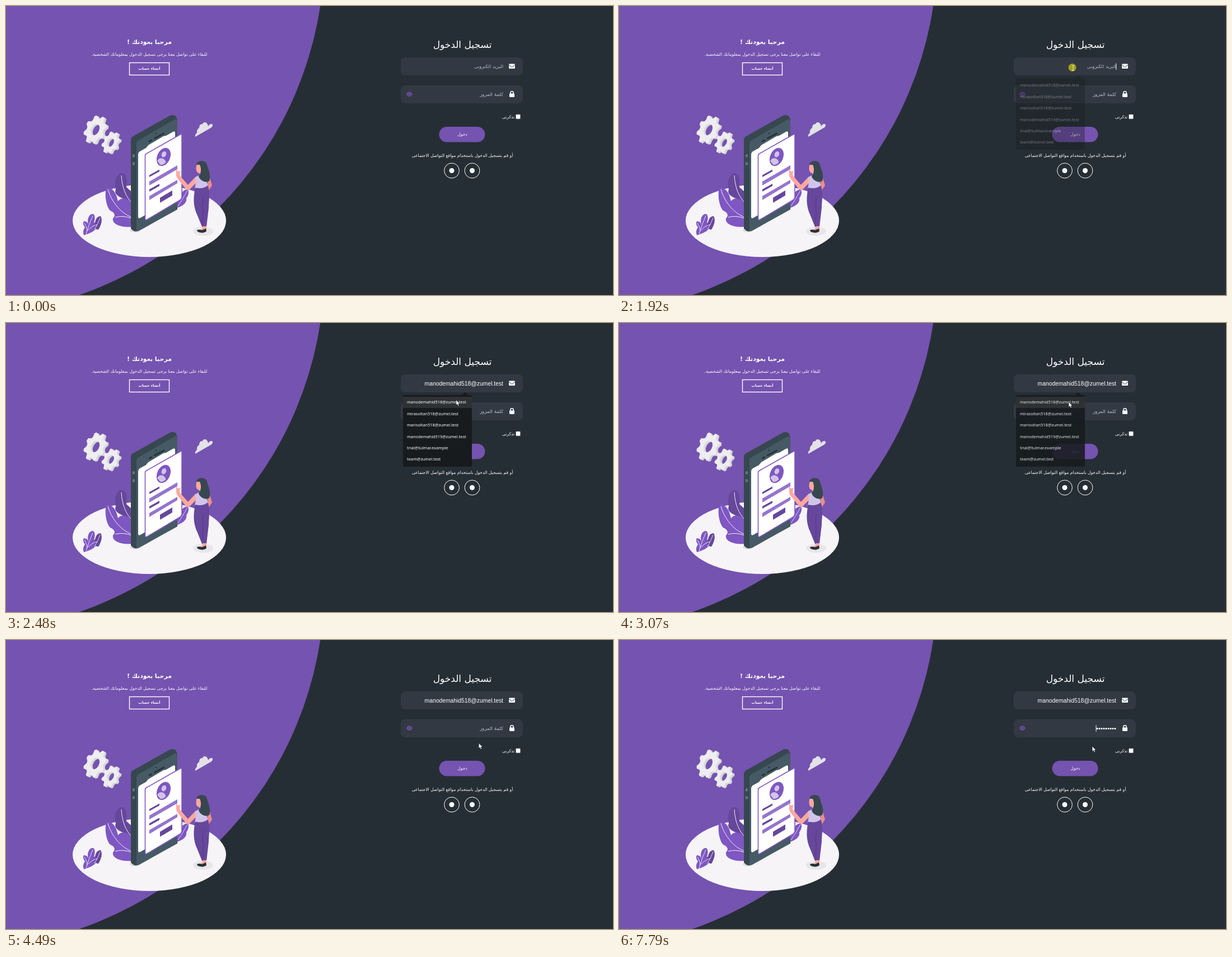
These frames come from a looping animation (1084 px wide and 517 px high, 8000 ms). An HTML page:

```html
<!DOCTYPE html>
<html lang="ar">
<head>
<meta charset="utf-8">
<title>Login</title>
<style>
  html, body { margin: 0; width: 100%; height: 100%; overflow: hidden; background: #262e35; }
  svg { display: block; width: 100%; height: 100%; }
  text { fill: #fff; font-family: "DejaVu Sans", sans-serif; }
  .ar { direction: rtl; }
  .mid { text-anchor: middle; }
  .hint { fill: #b9bcc1; }
  #mail { font: 10.35px "Liberation Sans", Arial, sans-serif; text-anchor: end; }
  #popup text { font: 7.35px "Noto Sans", sans-serif; }
  .line { fill: none; stroke: #fff; }
</style>
</head>
<body>
<svg viewBox="0 0 1084 517">
  <circle cx="-81" cy="-97" r="649.5" fill="#7553b0"/>

  <g id="art">
    <ellipse cx="256" cy="384" rx="137" ry="65" fill="#f6f4f7"/>
    <g id="gears"></g>
    <path d="M338 234Q337 230 341 227Q340 221 345 218Q345 211 351 211Q353 206 358 209Q361 212 361 215Q365 209 369 212Q370 216 364 219Z" fill="#e3e2e6"/>

    <path d="M226 358C212 354 207 351 210 345C198 340 193 335 196 328C193 315 196 300 207 299C217 301 216 315 215 324L226 334Z" fill="#66479b"/>
    <path d="M226 395C205 397 189 390 191 380C197 374 193 369 186 366C176 355 176 325 181 325C195 326 198 341 200 349C206 342 216 342 226 354Z" fill="#7e57c2"/>
    <path class="line" d="M182 328C187 346 202 370 225 378M206 303C207 324 214 342 225 352M195 378Q208 374 225 380" stroke-width=".9"/>

    <ellipse cx="230" cy="401" rx="9" ry="4" fill="#dedce0"/>
    <path d="M223 240Q223 235 227 233L291 197Q298 193 303 197L306 203V364L236 402Q231 405 226 401L223 398Z" fill="#37474f"/>
    <path d="M233 247Q233 242 237 240L301 203Q306 201 306 207V358Q306 363 302 366L238 402Q233 404 233 400Z" fill="#455a64"/>
    <path d="M236 266Q236 262 239 260L250 254L254 249L281 233L286 232L298 225Q302 223 302 227V343L240 379Q236 381 236 377Z" fill="#fff"/>
    <path d="M256 242L260 240M265 237L282 228" stroke="#263238" stroke-width="2.6" stroke-linecap="round"/>
    <circle cx="268" cy="228" r="1.2" fill="#263238"/>
    <g fill="#5f7580"><ellipse cx="228" cy="268" rx="2.2" ry="3"/><ellipse cx="228" cy="282" rx="2.2" ry="3"/></g>

    <path d="M306 356C304 345 308 342 312 340C312 332 320 328 325 328C328 335 324 341 322 344C324 352 315 358 306 361Z" fill="#7e57c2"/>
    <path class="line" d="M324 330Q316 345 307 358" stroke-width=".7"/>
    <path d="M248.5 268Q248.5 265 251 264L311 230Q314 228 314 231V342Q314 345 311 347L252 382Q248.5 384 248.5 380Z" fill="#fff" stroke="#7e57c2" stroke-width="1.6"/>
    <g transform="rotate(24 281.5 270)">
      <ellipse cx="281.5" cy="270" rx="11.5" ry="17" fill="#7e57c2"/>
      <ellipse cx="280" cy="265.500" rx="4" ry="5.500" fill="#d1c4e9"/>
      <path d="M274 281C274 271 287 271 289 278Q285 286 281 285Z" fill="#d1c4e9"/>
    </g>
    <path d="M256 302.500L274 292.500V296L256 306ZM256 328L274 318V322L256 332ZM275 343L297 330V339L275 352Z" fill="#66479b"/>
    <path d="M256 314L306 285V292L256 321ZM256 340L306 311V317L256 347Z" fill="#9575cd"/>

    <path d="M139 410C136 402 140 398 141 396C137 391 137 385 140 385C145 386 146 388 147 391C144 380 149 372 155 372C160 373 159 382 157 388C160 386 165 388 165 391C162 402 150 407 139 410Z" fill="#7e57c2"/>
    <path d="M158 395C159 382 162 376 169 376C173 382 170 392 165 400C162 400 160 399 158 395Z" fill="#66479b"/>
    <path class="line" d="M155 375Q148 391 143 408M163 391Q152 394 147 401M140 388Q145 397 145 403M168 379Q164 390 158 400" stroke-width=".8"/>

    <ellipse cx="352" cy="403" rx="18" ry="8" fill="#e8e6e9"/>
    <path d="M304 292L307 296L312 295Q309 300 311 304L325 320L339 305L343 313L328 328Q324 331 320 326L309 312Q303 306 304 300Z" fill="#ffa8a0"/>
    <path d="M359 311L364 308L368 321L362 330L356 329L361 320Z" fill="#eb8f89"/>
    <path d="M341 282Q338 292 341 297L346 300V306L351 307L354 287Z" fill="#ffa8a0"/>
    <path d="M338 307Q344 300 354 307L361 320Q352 329 337 326Q340 316 338 307Z" fill="#d1c4e9"/>
    <path d="M340 284C341 276 354 275 358 281C360 290 367 302 363 313C357 317 347 313 344 305C349 299 349 290 346 284Z" fill="#37474f"/>
    <path d="M338 325Q351 328 361 322C365 337 362 349 362 361L358 395H350L342 375C333 357 335 339 338 325Z" fill="#66479b"/>
    <path d="M353 341Q350 354 352 364L351 392" fill="none" stroke="#553a86"/>
    <path d="M352 394H358V402L347 403Z" fill="#ffa8a0"/>
    <path d="M341 401Q346 399 350 401L357 398L358 403Q353 407 346 405Q341 404 341 401Z" fill="#263238"/>
  </g>

  <text class="ar mid" x="256" y="68" font-size="11" font-weight="bold">مرحبا بعودتك !</text>
  <text class="ar mid" x="256" y="89" font-size="7.6">للبقاء على تواصل معنا يرجى تسجيل الدخول بمعلوماتك الشخصية.</text>
  <rect class="line" x="220.500" y="101.500" width="71" height="22" stroke-width="1.4"/>
  <text class="ar mid" x="256" y="114" font-size="6.4" font-weight="bold">أنشاء حساب</text>

  <text class="ar mid" x="815" y="74.500" font-size="17">تسجيل الدخول</text>
  <g fill="#323943"><rect x="705" y="92" width="218" height="32" rx="8"/><rect x="705" y="142" width="218" height="32" rx="8"/></g>
  <rect x="898" y="103.500" width="11" height="8.500" rx="1.200" fill="#fff"/>
  <path d="M898 105.500L903.500 109.500L909 105.500" class="line" style="stroke:#323943"/>
  <rect x="899" y="156.500" width="9" height="6.500" rx="1" fill="#fff"/>
  <path d="M900.800 157V155.500a2.700 2.700 0 0 1 5.400 0V157" class="line" stroke-width="1.500"/>
  <path d="M715 157.700Q720.300 149.300 725.600 157.700Q720.300 166.100 715 157.700Z" fill="#7553b0"/>
  <circle cx="720.300" cy="157.700" r="2.300" fill="#7553b0" stroke="#323943"/>
  <text id="mailHint" class="ar hint" x="888" y="110.500" font-size="8.500">البريد الكترونى</text>
  <text id="mail" x="888" y="111.500">manodemahid518@zumel.test</text>
  <text id="passHint" class="ar hint" x="888" y="160.500" font-size="8.500">كلمة المرور</text>
  <g id="dots" fill="#fff"></g>
  <rect id="caret" width="1" height="11.500" fill="#fff"/>

  <rect x="910.500" y="194" width="8" height="8" rx="1.200" fill="#fff" stroke="#777" stroke-width=".7"/>
  <text class="ar" x="908" y="200.500" font-size="7.500">تذكرنى</text>
  <rect x="773.500" y="216" width="82" height="27.500" rx="13.700" fill="#7553b0"/>
  <text class="ar mid" x="815" y="232" font-size="7.600">دخول</text>
  <text class="ar mid" x="815" y="269.500" font-size="7.600">أو قم بتسجيل الدخول باستخدام مواقع التواصل الاجتماعى</text>
  <g class="line"><circle cx="796" cy="294.500" r="13.400"/><circle cx="832.500" cy="294.500" r="13.400"/></g>
  <g fill="#fff"><circle cx="796" cy="294.500" r="4.500"/><circle cx="832.500" cy="294.500" r="4.500"/></g>

  <g id="popup">
    <path d="M711 129H814L820 124L826 129H830Q832 129 832 131V255Q832 257 830 257H711Q709 257 709 255V131Q709 129 711 129Z" fill="#171b1e"/>
    <rect id="hover" x="709" y="132" width="123" height="20" fill="#2e3234"/>
  </g>
  <circle id="click" r="7" fill="#a39d1c"/>
  <path id="beam" class="line" d="M-2 -4.500H-.5L0 -4L.5 -4.500H2M0 -4V4M-2 4.500H-.5L0 4L.5 4.500H2" stroke-width=".9" opacity=".85"/>
  <path id="arrow" d="M0 0V9.500L2.200 7.600L3.800 11L5.500 10.200L4 7H7Z" fill="#fff" stroke="#15191c" stroke-width=".7"/>
</svg>
<script>
const NS = "http://www.w3.org/2000/svg", LOOP = 8000;
const $ = id => document.getElementById(id);
const add = (parent, tag, attrs) => {
  const el = document.createElementNS(NS, tag);
  for (const k in attrs) el.setAttribute(k, attrs[k]);
  return parent.appendChild(el);
};
const show = (id, on) => { $(id).style.display = on ? "" : "none"; };
const between = (t, a, b) => t >= a && t < b;

function gear(cx, cy, r) {
  let d = "";
  for (let i = 0; i < 32; i++) {
    const a = (i + .5) * Math.PI / 16, q = i % 4 < 2 ? r : r * .78;
    d += (i ? "L" : "M") + (q * Math.cos(a)).toFixed(1) + " " + (q * Math.sin(a)).toFixed(1);
  }
  const h = r * .4;
  d += `ZM${h} 0A${h} ${h} 0 1 0 ${-h} 0A${h} ${h} 0 1 0 ${h} 0Z`;
  [["#d3d2d6", 2], ["#dddce0", 0], ["#eeedf0", -2]].forEach(([fill, s]) =>
    add($("gears"), "path", { d, fill, "fill-rule": "evenodd",
      transform: `translate(${cx + s} ${cy + s / 2}) rotate(27) scale(.68 1)` }));
}
gear(161, 222, 27);
gear(188.5, 245, 21);

["manodemahid518@zumel.test", "mirasoltan518@zumel.test", "marisoltan518@zumel.test",
 "manodemahid519@zumel.test", "trial@tulmar.example", "team@zumel.test"].forEach((s, i) =>
  add($("popup"), "text", { x: 716, y: 144.3 + 20.4 * i }).textContent = s);

const keys = [5600, 5700, 5960, 6130, 6330, 6780, 7340, 7590, 7790];
const dots = keys.map((_, i) => add($("dots"), "circle", { cx: 886 - 4 * i, cy: 158.5, r: 1.6 }));

// start, end, steps, target x, target y
const moves = [
  [600, 850, 6, 811, 144], [1150, 1520, 8, 811, 111], [2120, 2270, 4, 806, 127],
  [2430, 2560, 4, 803, 141], [3120, 3270, 4, 812, 143], [3320, 3480, 4, 840, 156],
  [4390, 4590, 5, 845, 190]
];
function cursorAt(t) {
  let x = 1060, y = 525;
  for (const [a, b, n, tx, ty] of moves) {
    if (t < a) break;
    const k = Math.min(n, 1 + Math.floor((t - a) / (b - a) * (n - 1) + 1e-6));
    const p = k / n, e = p * (2 - p);
    x += (tx - x) * e;
    y += (ty - y) * e;
  }
  return [x, y];
}

function render(t) {
  const [x, y] = cursorAt(t);
  const typed = keys.filter(k => t >= k).length;
  const inField = t >= 800 && t < 2120 || t >= 3320 && t < 4490;
  for (const id of ["beam", "arrow"]) {
    show(id, t >= 600 && (id === "beam") === inField);
    $(id).setAttribute("transform", `translate(${x} ${y})`);
  }
  show("click", between(t, 1920, 2120) || between(t, 2970, 3020) || between(t, 3830, 3980));
  $("click").setAttribute("cx", x - (t < 2200 ? 1.5 : 0));
  $("click").setAttribute("cy", y - (t < 2200 ? 1 : 0));

  const fadeIn = (t - 1870) / 150, fadeOut = 1 - (t - 3050) / 170;
  const alpha = Math.max(0, Math.min(1, fadeIn, fadeOut));
  $("popup").setAttribute("opacity", t < 1920 ? 0 : alpha);
  show("hover", t >= 2480);
  show("mailHint", t < 2480);
  show("mail", t >= 2480);
  show("passHint", !typed);
  dots.forEach((dot, i) => dot.style.display = i < typed ? "" : "none");

  const mailCaret = between(t, 1920, 2450), filledCaret = between(t, 3130, 3630);
  const passCaret = between(t, 3830, 4390) || between(t, 4890, 5450) || typed > 0;
  show("caret", mailCaret || filledCaret || passCaret);
  $("caret").setAttribute("x", filledCaret ? 746.5 : typed ? 887.5 - 4 * typed : 887.3);
  $("caret").setAttribute("y", t < 3700 ? 102.5 : 152.3);
}

function tick(now) {
  render(now % LOOP);
  requestAnimationFrame(tick);
}
requestAnimationFrame(tick);
</script>
</body>
</html>
```
